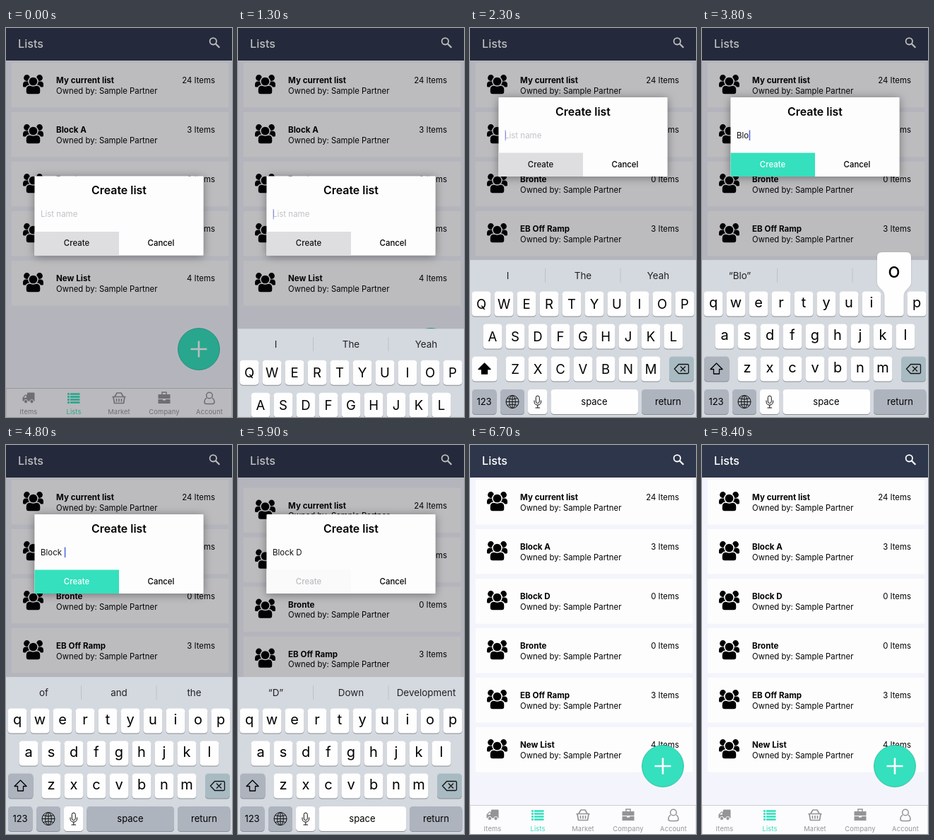
An HTML page that plays this animation: 320 by 550 pixels, repeating every 8.5 s.

```html
<!DOCTYPE html>
<html lang="en">
<head>
<meta charset="utf-8">
<title>Create list</title>
<style>
html, body { margin: 0; width: 100%; height: 100%; overflow: hidden; }
svg { display: block; width: 320px; height: 550px; font-family: Inter, Roboto, sans-serif; }
text { white-space: pre; }
</style>
</head>
<body>
<svg id="stage" viewBox="0 0 320 550"></svg>
<script>
const LOOP = 8500, STEP = 100;
const TEAL = '#34e0bd', GREY = '#949498', KEY_GREY = '#adb4be', TAB_BAR = '#fcfbfd';
const KB_HEIGHT = 222, DIALOG_LIFT = 111.5;
const $ = id => document.getElementById(id);
const clamp = v => Math.max(0, Math.min(1, v));
const ramp = (t, from, to) => clamp((t - from) / (to - from));

const label = (x, y, s, size, attrs = '') =>
  `<text x="${x}" y="${y}" font-size="${size}" ${attrs}>${s}</text>`;
const centred = (x, y, s, size, attrs = '') => label(x, y, s, size, 'text-anchor="middle" ' + attrs);
const rect = (x, y, w, h, fill, attrs = '') =>
  `<rect x="${x}" y="${y}" width="${w}" height="${h}" fill="${fill}" ${attrs}/>`;

// List page
const people = `
  <g id="people">
    <circle cx="-9" cy="-9.500" r="4.400"/><circle cx="9" cy="-9.500" r="4.400"/>
    <path d="M-14.500 2V0q0-4.500 4-4.500h5V3.500h-7.500q-1.500 0-1.500-1.500zM14.500 2V0q0-4.500-4-4.500h-5V3.500h7.500q1.500 0 1.500-1.500z"/>
    <g stroke="#fff" stroke-width="1.500">
      <path d="M-10.500 10V7q0-6 6-6h9q6 0 6 6v3q0 4-4 4h-13q-4 0-4-4z"/>
      <circle cy="-4.500" r="6.600"/>
    </g>
  </g>`;
const rows = [['My current list', 24], ['Block A', 3], ['Bronte', 0], ['EB Off Ramp', 3], ['New List', 4]];
const extended = [...rows.slice(0, 2), ['Block D', 0], ...rows.slice(2)];
const list = data => data.map(([name, count], i) => `
  <g transform="translate(0 ${70 * i})">
    ${rect(8, 49, 307, 63.5, '#fefdfe')}
    <use href="#people" x="38.5" y="80"/>
    ${label(71, 78, name, 11.6, 'font-weight="700"')}
    ${label(71, 92.5, 'Owned by: Sample Partner', 11.35)}
    ${label(296, 78, count + ' Items', 11.4, 'text-anchor="end"')}
  </g>`).join('');

const tabIcons = {
  Items: `<path d="M-2-6.500q0-1 1-1H7.500q1 0 1 1V4.500H-8.500V-.500L-5-4.500H-2z"/><path d="M-7-.200L-4.500-3.200H-3.200V-.200z" fill="${TAB_BAR}"/>
    <g stroke="${TAB_BAR}" stroke-width="1"><circle cx="-4" cy="5" r="2.600"/><circle cx="4.500" cy="5" r="2.600"/></g>`,
  Lists: [-5.5, -1.5, 2.5, 6.5].map(y => rect(-9, y - 1.3, 3, 2.6, TEAL) + rect(-5, y - 1.3, 13.5, 2.6, TEAL)).join(''),
  Market: '<path d="M-9.500-1.500h19M-8-1L-6.500 7.500h13L8-1M-6-2L-3-7H3L6-2M-3.500 1V5.500M0 1V5.500M3.500 1V5.500" fill="none" stroke-width="1.700"/>',
  Company: '<path d="M-3-5V-8H3V-5" fill="none" stroke-width="1.500"/><path d="M-8.500-5h17V1h-17zM-8.500 2H-2V3.500H2V2H8.500V8h-17z"/>',
  Account: '<g fill="none" stroke-width="1.500"><circle cy="-3.500" r="4.300"/><path d="M-4 0Q-7 2-7 6q0 2.500 3 2.500H4Q7 8.500 7 6 7 2 4 0"/></g>'
};
const tabs = Object.entries(tabIcons).map(([name, icon], i) => {
  const x = 32 + 64 * i, colour = name === 'Lists' ? TEAL : GREY;
  return `<g transform="translate(${x} 523)" fill="${colour}" stroke="${colour}" stroke-width="0">${icon}</g>` +
    centred(x, 545.5, name, 9.4, `fill="${colour}" letter-spacing=".12"`);
}).join('');

const page = `
  ${rect(0, 0, 320, 550, '#f4f5fc')}
  <g id="oldList">${list(rows)}</g>
  <g id="newList">${list(extended)}</g>
  ${rect(0, 0, 320, 46, '#2e364b')}
  ${label(17, 28, 'Lists', 16.2, 'fill="#fff" font-weight="500"')}
  <g fill="none" stroke="#fff" stroke-width="1.800"><circle cx="293.300" cy="18.800" r="4.700"/><path d="M296.800 22.300L302.300 27.800" stroke-width="2.200"/></g>
  <circle cx="273" cy="454" r="29.500" fill="${TEAL}" stroke="#2bb79b" stroke-width=".8"/>
  <path d="M261.500 454h23M273 442.500v23" stroke="#fff" stroke-width="2.600"/>
  ${rect(0, 509.5, 320, 41, TAB_BAR, 'stroke="#cdcdd2"')}
  ${tabs}`;

// Dialog
const dialog = `
  ${rect(40.5, 209.5, 239, 112, '#fefdfe', 'rx="1" filter="url(#dialogShadow)"')}
  ${centred(160, 235, 'Create list', 15.9, 'font-weight="600"')}
  <text id="field" x="49" y="267" font-size="11.5"></text>
  <rect id="caret" y="256" width="1.5" height="14.5" fill="#4967d8"/>
  ${rect(40.5, 288, 119.5, 33.5, '#dedddf', 'id="button"')}
  ${centred(100, 308, 'Create', 11.4, 'id="buttonText" font-weight="500"')}
  ${centred(219.5, 308, 'Cancel', 11.4, 'font-weight="500"')}`;

// Keyboard
const keyRows = [['QWERTYUIOP', 16, 390], ['ASDFGHJKL', 32, 436], ['ZXCVBNM', 64, 482]];
const keyAt = {};
const key = (x, y, w, fill = '#fefefe', id = '') =>
  rect(x, y - 16, w, 34.5, '#898c92', 'rx="4.5"') + rect(x, y - 17.5, w, 35, fill, `rx="4.5" id="${id}"`);
const letters = keyRows.map(([chars, x0, y]) => [...chars].map((c, i) => {
  const x = x0 + 32 * i;
  keyAt[c] = [x, y];
  return key(x - 13.5, y, 27) + centred(x, y + 6.7, c, 18.5, 'class="upper"') +
    centred(x, y + 5, c.toLowerCase(), 20, 'class="lower"');
}).join('')).join('');

const keyboard = `
  ${rect(0, 328, 320, 222, '#d4d8df')}
  ${[106.5, 213].map(x => rect(x - .5, 340, 1, 20, '#bcc0c7')).join('')}
  ${[53.5, 160, 266.5].map((x, i) => centred(x, 355, '', 13.4, `id="hint${i}" fill="#222"`)).join('')}
  ${letters}
  ${key(3, 482, 35.5, '#fff', 'shiftKey')}
  <path id="shiftIcon" d="M20.500 474l8.500 8.500h-4.500v6.500h-8v-6.500h-4.500z" stroke="#000" stroke-width="1.300" stroke-linejoin="round"/>
  ${key(282, 482, 35, '#a9bbc2')}
  <path d="M289.500 482l6-6.500h12.500q1.500 0 1.500 1.500v10q0 1.500-1.500 1.500h-12.500zM298 478.500l7 7m0-7l-7 7" fill="none" stroke="#111" stroke-width="1.300"/>
  ${key(3, 528.5, 34.5, KEY_GREY)}${centred(20, 533, '123', 13)}
  ${key(43, 528.5, 34, KEY_GREY)}
  <g fill="none" stroke="#111"><circle cx="60" cy="528.500" r="9"/><ellipse cx="60" cy="528.500" rx="4.300" ry="9"/><path d="M60 519.500v18M51 528.500h18M52.500 523.500q7.500 3 15 0M52.500 533.500q7.500-3 15 0"/></g>
  ${key(82, 528.5, 27.5)}
  <rect x="93.300" y="520" width="5" height="10.500" rx="2.500" fill="none" stroke="#111"/>
  <path d="M91 526.500v1.500q0 5 4.800 5t4.800-5v-1.500M95.800 533v4M92.500 537h6.600" fill="none" stroke="#111"/>
  ${key(114.5, 528.5, 123.5, '#fefefe', 'spaceKey')}${centred(176, 532.5, 'space', 13)}
  ${key(243, 528.5, 74.5, KEY_GREY)}${centred(280.5, 532.5, 'return', 13)}
  <g id="popup">
    <path d="M-24-66q0-7 7-7h34q7 0 7 7v35c0 9-10.500 10-10.500 20v24q0 4-4 4h-19q-4 0-4-4v-24c0-10-10.500-11-10.500-20z" fill="#fefefe" filter="url(#popupShadow)"/>
    ${centred(0, -37, '', 29, 'id="popupText"')}
  </g>`;

$('stage').innerHTML = `
  <defs>
    ${people}
    <filter id="popupShadow"><feDropShadow dx="0" dy=".5" stdDeviation="1" flood-opacity=".16"/></filter>
    <filter id="dialogShadow" x="-20%" y="-25%" width="140%" height="150%"><feDropShadow dx="0" dy="1.5" stdDeviation="6.500" flood-opacity=".4"/></filter>
  </defs>
  ${page}
  ${rect(0, 0, 320, 550, '#0a0812', 'id="dim"')}
  <g id="dialog">${dialog}</g>
  <g id="keyboard">${keyboard}</g>`;

// Key presses: time, field text, suggestions
const presses = [
  [0, '', ['I', 'The', 'Yeah']],
  [2950, 'B', ['“B”', '', '']],
  [3400, 'Bl', ['“Bl”', '', '']],
  [3750, 'Blo', ['“Blo”', '', '']],
  [4150, 'Bloc', ['“Bloc”', 'Block', 'Blocks']],
  [4400, 'Block', ['“Block”', 'Blocks', 'Blocked']],
  [4700, 'Block ', ['of', 'and', 'the']],
  [5200, 'Block D', ['“D”', 'Down', 'Development']]
];
const PRESS = 200, SUBMIT = 5600, CLOSE = 5950;
const show = (el, on) => el.setAttribute('visibility', on ? 'inherit' : 'hidden');
const shift = (el, y) => el.setAttribute('transform', `translate(0 ${y})`);

function draw(t) {
  const [pressed, value, hints] = presses.findLast(p => p[0] <= t);
  const closing = t >= CLOSE;

  // Page
  show($('oldList'), !closing);
  show($('newList'), closing);
  shift($('oldList'), 11.5 * ramp(t, 5700, 5900));
  shift($('newList'), 11.5 * (1 - ramp(t, 5950, 6300)));
  const fade = 1 - ramp(t, CLOSE, 6250);
  $('dim').setAttribute('opacity', .27 * fade);

  // Dialog
  $('dialog').setAttribute('opacity', fade);
  shift($('dialog'), t < 2000 ? 0 : -DIALOG_LIFT);
  const field = $('field');
  field.textContent = value || 'List name';
  field.setAttribute('fill', value ? '#111' : '#c2c1c6');
  $('caret').setAttribute('x', 49.5 + (value ? field.getComputedTextLength() : 0));
  const phase = (t - 550) % 1000;
  const blink = value || phase > 950 ? 1 : clamp((800 - phase) / 100);
  $('caret').setAttribute('opacity', t >= 1200 && t < SUBMIT ? blink : 0);
  const [fill, ink] = t >= SUBMIT ? ['#fbfafb', '#bcbbbe'] : value ? [TEAL, '#fff'] : ['#dedddf', '#111'];
  $('button').setAttribute('fill', fill);
  $('buttonText').setAttribute('fill', ink);

  // Keyboard
  const rise = (1 - ramp(t, 1020, 2183)) ** 3, fall = ramp(t, CLOSE, 6400);
  shift($('keyboard'), KB_HEIGHT * (closing ? fall * fall * (3 - 2 * fall) : rise));
  hints.forEach((h, i) => $('hint' + i).textContent = h);
  const upper = t < 2950 + PRESS || (t >= 5000 && t < 5200 + PRESS);
  document.querySelectorAll('.upper').forEach(e => show(e, upper));
  document.querySelectorAll('.lower').forEach(e => show(e, !upper));
  $('shiftKey').setAttribute('fill', upper ? '#fefefe' : KEY_GREY);
  $('shiftIcon').setAttribute('fill', upper ? '#000' : 'none');
  const held = value && t < pressed + PRESS ? value.at(-1) : '';
  $('spaceKey').setAttribute('fill', held === ' ' ? KEY_GREY : '#fefefe');
  const spot = keyAt[held.toUpperCase()];
  show($('popup'), spot);
  if (spot) {
    $('popup').setAttribute('transform', `translate(${spot})`);
    $('popupText').textContent = held;
  }
}

function tick() {
  draw(Math.floor(performance.now() % LOOP / STEP) * STEP);
  requestAnimationFrame(tick);
}
tick();
</script>
</body>
</html>
```
